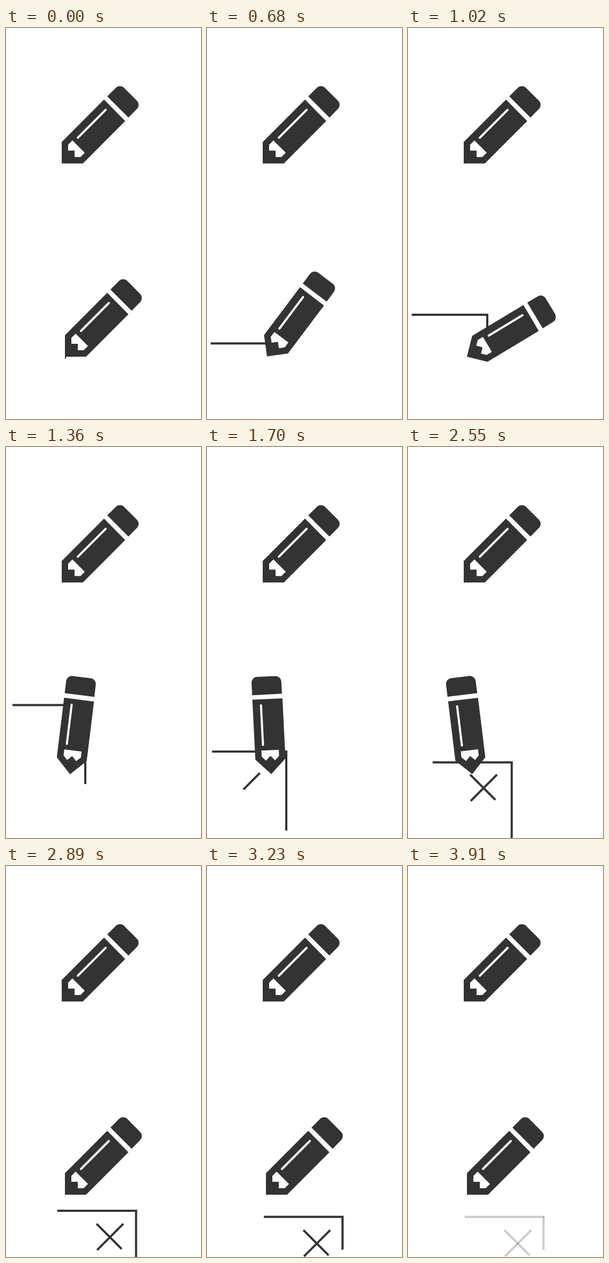
An HTML page with a canvas for the animation above (4.08 s loop, 364x728 px).

```html
<!DOCTYPE html>
<html lang="en">
<head>
<meta charset="utf-8">
<title>Pencil drawing a box</title>
<style>
  html, body { margin: 0; width: 100%; height: 100%; overflow: hidden; background: #fff; }
  canvas { display: block; width: 364px; height: 728px; }
</style>
</head>
<body>
<canvas id="stage" width="364" height="728"></canvas>
<script>
const ctx = document.getElementById('stage').getContext('2d');
const INK = '#333';
const STEP = 170, STEPS = 24, LAST = 19;

// Progress from 0 to 1 between steps a and b, plain and eased.
const ramp = (k, a, b) => Math.min(1, Math.max(0, (k - a) / (b - a)));
const easeIn = (k, a, b) => ramp(k, a, b) ** 2;
const easeOut = (k, a, b) => Math.sin(ramp(k, a, b) * Math.PI / 2);
const smooth = (k, a, b) => {
  const u = ramp(k, a, b);
  return u * u * (3 - 2 * u);
};

// The pencil leans left, swings right, stands up and falls back.
const pencilAngle = k =>
  22 * ramp(k, 4, 6) - 8 * ramp(k, 0, 4) - 52 * easeIn(k, 6, 8)
  - 14 * easeOut(k, 8, 12) + 52 * ramp(k, 15, 17);

// The drawing slides under the pencil, then settles below it.
function paper(k) {
  const settle = smooth(k, 12.4, 18.1);
  const sway = 12 * Math.sin(Math.PI * ramp(k, 5, 12));
  return {
    left: 110 * 0.5 ** k + sway + 106 * settle,
    right: 112 + 38 * ramp(k, 3, 4) + 105 * settle,
    y: 614 - 133.5 * ramp(k, 3, 8) + 100 * easeOut(k, 8, 11)
      - 44 * smooth(k, 11, 13.4) + 116.8 * settle,
    settle
  };
}

function polygon(points, color) {
  ctx.fillStyle = color;
  ctx.beginPath();
  points.forEach(([x, y]) => ctx.lineTo(x, y));
  ctx.fill();
}

function segment(x, y, dx, dy, color, cap) {
  ctx.strokeStyle = color;
  ctx.lineWidth = 4;
  ctx.lineCap = cap;
  ctx.beginPath();
  ctx.moveTo(x, y);
  ctx.lineTo(x + dx, y + dy);
  ctx.stroke();
}

// The origin is the tip of the pencil.
function pencil(x, y, degrees) {
  ctx.save();
  ctx.translate(x, y);
  ctx.rotate(degrees * Math.PI / 180);
  polygon([[85, -125], [79, -119], [118, -79], [124, -86]], '#fff');
  polygon([[0, 0], [0, -40], [79, -119], [118.5, -79], [39.5, 0]], INK);

  ctx.fillStyle = INK;
  ctx.beginPath();
  ctx.moveTo(85, -125);
  ctx.arcTo(108.7, -148.7, 148, -109.4, 11);
  ctx.arcTo(148, -109.4, 124.5, -85.5, 11);
  ctx.lineTo(124.5, -85.5);
  ctx.fill();

  segment(30, -48, 52, -52, '#fff', 'round');
  polygon([[20, -43], [43, -20], [35, -12], [24, -12], [24, -24], [12, -24], [12, -35]], '#fff');
  ctx.restore();
}

function box(k, { left, right, y }) {
  ctx.fillStyle = INK;
  ctx.fillRect(left, y - 2, right - left, 4);
  const trim = ramp(k, 16, 18);
  const end = y + 147 * ramp(k, 3.6, 7.9) - 85 * trim;
  if (end > y) {
    polygon([[right - 4, y], [right, y], [right, end - 2 * trim], [right - 4, end]], INK);
  }
}

function cross(k, { right, y, settle }) {
  const cx = right - 58 + 8 * settle;
  const cy = y + 46 + 3 * settle;
  const rise = 49 * ramp(k, 9, 10.6);
  const back = 47 * ramp(k, 13, 15);
  if (rise) segment(cx - 24, cy + 24.5, rise, -rise, INK, 'butt');
  if (back) segment(cx + 22, cy + 22.5, -back, -back, INK, 'butt');
}

function draw(time) {
  const step = Math.floor(time / STEP) % STEPS;
  const k = Math.min(step, LAST);
  const sheet = paper(k);
  const angle = pencilAngle(k);
  const lean = ramp(-angle, 0, 40);

  ctx.fillStyle = '#fff';
  ctx.fillRect(0, 0, 364, 728);

  ctx.globalAlpha = 1 - 0.1875 * (step - k);
  box(k, sheet);
  cross(k, sheet);
  ctx.globalAlpha = 1;

  pencil(104, 252.3, 0);
  pencil(110 + 10 * lean, 612 - 3 * lean, angle);
}

const start = performance.now();
function tick() {
  draw(performance.now() - start);
  requestAnimationFrame(tick);
}
tick();
</script>
</body>
</html>
```
